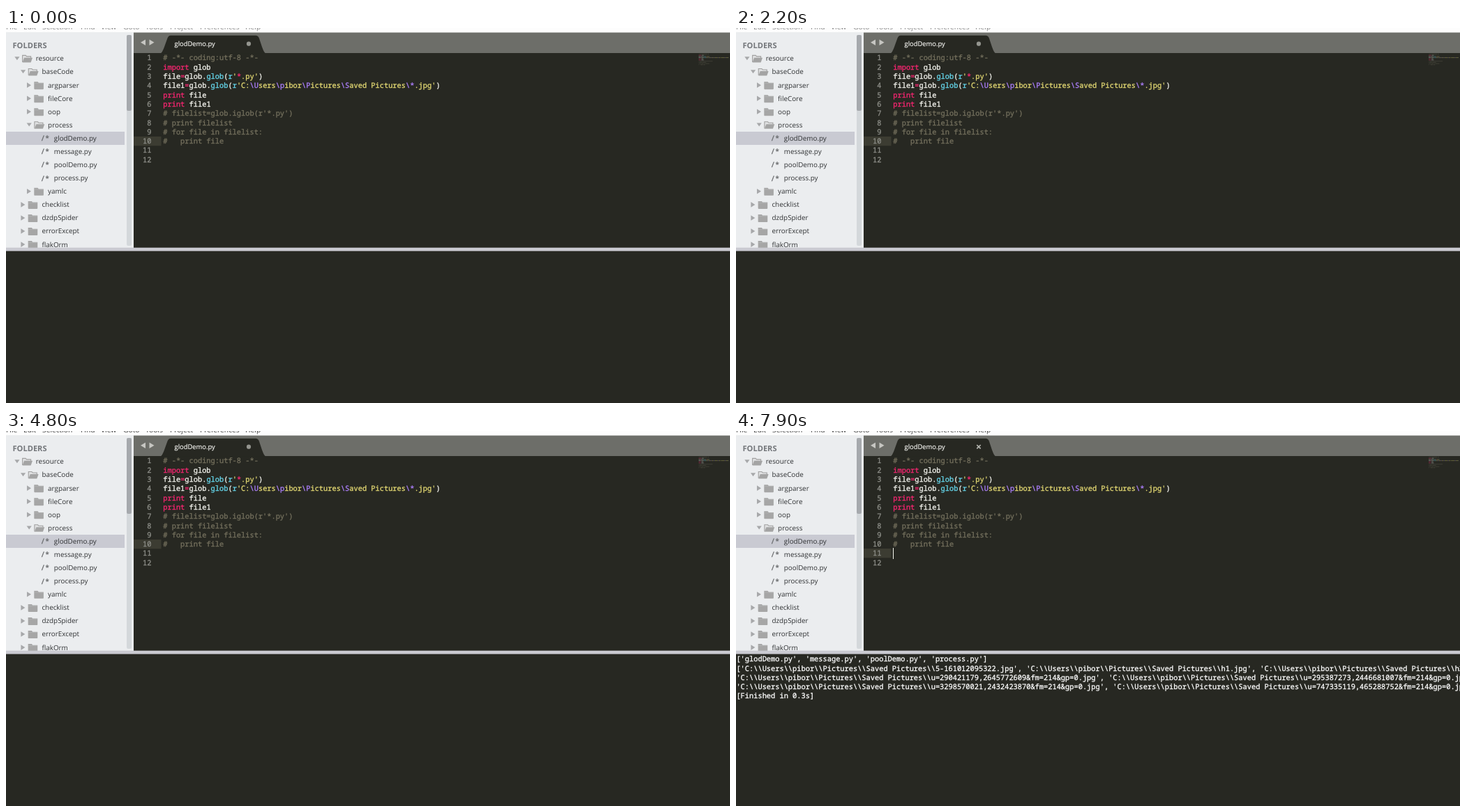
Animation, 1038 px wide and 539 px high, one loop 8 s. Source, as an HTML page:

```html
<!DOCTYPE html>
<html lang="en">
<head>
<meta charset="utf-8">
<title>Editor</title>
<style>
  html, body { margin: 0; width: 100%; height: 100%; overflow: hidden; background: #272822; }
  svg { display: block; }
  text { white-space: pre; text-rendering: geometricPrecision; }
  .ui { font-family: "Open Sans", "Noto Sans", sans-serif; }
  .code { font-family: "Noto Sans Mono", "DejaVu Sans Mono", monospace; font-size: 10.358px; stroke-width: .3px; }
</style>
</head>
<body>
<svg id="stage" width="1038" height="539" viewBox="0 0 1038 539"></svg>
<script>
const LOOP = 8000;
const stage = document.getElementById('stage');

function add(tag, attrs, parent = stage) {
  const el = document.createElementNS('http://www.w3.org/2000/svg', tag);
  for (const k in attrs) el.setAttribute(k, attrs[k]);
  parent.appendChild(el);
  return el;
}
const rect = (x, y, width, height, fill, more) => add('rect', { x, y, width, height, fill, ...more });
const path = (d, fill, more) => add('path', { d, fill, ...more });
function label(x, y, str, fill, size, more) {
  const el = add('text', { x, y, fill, 'font-size': size, class: 'ui', ...more });
  el.textContent = str;
  return el;
}
// A thin stroke in the text colour gives the heavier code weight.
function mono(x, y, parts, more) {
  const el = add('text', { x, y, class: 'code', ...more });
  for (const [fill, str] of parts) add('tspan', { fill, stroke: fill }, el).textContent = str;
  return el;
}

// Held values: each [time, value] lasts until the next one.
function hold(el, prop, steps) {
  const frames = steps.map(([t, v]) => ({ offset: t / LOOP, [prop]: v, easing: 'steps(1, end)' }));
  frames.push({ offset: 1, [prop]: steps[steps.length - 1][1] });
  el.animate(frames, { duration: LOOP, iterations: Infinity }).startTime = 0;
}

// Backgrounds
rect(0, 0, 1038, 539, '#272822');
rect(0, 0, 1038, 7, '#fdfdfd');
rect(0, 6, 183, 310, '#ebedef');
rect(183, 6.5, 855, 29.5, '#6d6e69');

// Menu bar, cut by the top edge
const menu = [['File', 0], ['Edit', 25], ['Selection', 52], ['Find', 107], ['View', 136], ['Goto', 168],
  ['Tools', 200], ['Project', 235], ['Preferences', 278], ['Help', 343]];
for (const [name, x] of menu) {
  hold(label(x, 1.5, name, '#888888', 10.25), 'fill', [[0, '#888888'], [4800, '#444444']]);
}

// Sidebar
const ROW = 19.08, TOP = 34.5;
const tree = [
  [0, 'resource', 'open'], [1, 'baseCode', 'open'], [2, 'argparser', 'shut'], [2, 'fileCore', 'shut'],
  [2, 'oop', 'shut'], [2, 'process', 'open'], [3, 'glodDemo.py', 'file'], [3, 'message.py', 'file'],
  [3, 'poolDemo.py', 'file'], [3, 'process.py', 'file'], [2, 'yamlc', 'shut'], [1, 'checklist', 'shut'],
  [1, 'dzdpSpider', 'shut'], [1, 'errorExcept', 'shut'], [1, 'flakOrm', 'shut']
];
const hovers = {
  8: [[0, 0], [800, .6], [900, 1], [1100, .5], [1200, 0]],
  7: [[0, 0], [1400, .5], [1500, 1], [1700, .5], [1800, 0]],
  10: [[0, 0], [1900, .5], [2000, 1], [2100, .5], [2200, 0]],
  12: [[0, 0], [2700, .5], [2800, 1], [3000, .5], [3100, 0]]
};
const rowTop = i => Math.round(TOP + ROW * i);

rect(0, rowTop(6), 170, 19, '#c9cad2');
for (const i in hovers) {
  hold(rect(0, rowTop(i), 170, 19, '#dadbe0', { opacity: 0 }), 'opacity', hovers[i]);
}

function folder(x, y, open) {
  if (!open) {
    path(`M${x} ${y - 5}h5.2l1.4 1.6h7v8.6q0 .8-.8.8h-12q-.8 0-.8-.8z`, '#a6a6a6');
    path(`M${x + .6} ${y - 2.6}h12.6`, 'none', { stroke: '#b9babb', 'stroke-width': .6 });
    return;
  }
  path(`M${x + .6} ${y + 5}v-9.6h4.6l1.4 1.5h6v2.2`, '#e0e1e2', { stroke: '#a0a0a0', 'stroke-width': 1.1 });
  path(`M${x + .6} ${y + 5.4}l2.5-6.6h11.9l-2.4 6.6z`, '#a4a4a4');
}

label(9.5, 28.7, 'FOLDERS', '#74777b', 11.1, { 'font-weight': 700 });
tree.forEach(([depth, name, kind], i) => {
  const y = 44 + ROW * i, x = depth * 8.65;
  if (kind === 'file') {
    mono(49.8, y + 3.8, [['#66686a', '/*']], { 'stroke-width': 0 });
  } else {
    const t = x + 12.3;
    path(kind === 'open' ? `M${t} ${y - 2.8}h7.2l-3.6 5z` : `M${t + .4} ${y - 3.8}v7.6l6-3.8z`, '#a7a8aa');
    folder(x + 23, y, kind === 'open');
  }
  label(x + 42.8, y + 3.4, name, '#303234', 9.85);
});

rect(173, 10, 7, 303, '#d4d8db', { rx: 2 });
rect(173, 10, 7, 109, '#a6a9ad', { rx: 2 });

// Tab strip
const back = path('M193 20.7l7-4.3v8.6z', '#c6c6c2');
hold(back, 'fill', [[0, '#c6c6c2'], [700, '#e4e4e0'], [800, '#c6c6c2']]);
path('M212.5 20.7l-7-4.3v8.6z', '#c6c6c2');
path('M222 36.2C225 34 227 27 231 16Q232.6 10.8 236 10.8H358Q361.4 10.8 363 15C367 27 369 34 372 36.2z', '#272822');
label(241.5, 26.3, 'glodDemo.py', '#f8f8f4', 9.4, { stroke: '#f8f8f4', 'stroke-width': .15 });
const dot = add('circle', { cx: 348, cy: 22.7, r: 3.1, fill: '#94958f' });
const cross = path('M345.3 20l5.4 5.4m0-5.4l-5.4 5.4', 'none', { stroke: '#b5b6b0', 'stroke-width': 1.7, opacity: 0 });
hold(dot, 'opacity', [[0, 1], [5900, 0]]);
hold(cross, 'opacity', [[0, 0], [5900, 1]]);

// Code
const W = '#f8f8f2', R = '#f92672', B = '#66d9ef', Y = '#e6db74', P = '#ae81ff', C = '#75715e';
const call = name => [[W, name], [R, '='], [W, 'glob.'], [B, 'glob'], [W, '('], [B, 'r']];
const code = [
  [[C, '# -*- coding:utf-8 -*-']],
  [[R, 'import'], [W, ' glob']],
  [...call('file'), [Y, "'"], [R, '*'], [Y, ".py'"], [W, ')']],
  [...call('file1'), [Y, "'C:"], [P, '\\U'], [Y, 'sers'], [P, '\\p'], [Y, 'ibor'], [P, '\\P'], [Y, 'ictures'],
    [P, '\\S'], [Y, 'aved Pictures'], [P, '\\*'], [Y, ".jpg'"], [W, ')']],
  [[R, 'print'], [W, ' file']],
  [[R, 'print'], [W, ' file1']],
  [[C, "# filelist=glob.iglob(r'*.py')"]],
  [[C, '# print filelist']],
  [[C, '# for file in filelist:']],
  [[C, '#   print file']],
  [],
  []
];
const LINE = 13.3;
const mark = rect(183, 156, 39.5, 13.3, '#3c3c32');
hold(mark, 'y', [[0, '156px'], [4900, '169px']]);

// Minimap
const view = rect(993, 36, 45, 36, '#ffffff', { opacity: 0 });
hold(view, 'opacity', [[0, 0], [300, .03], [400, 0]]);

code.forEach((parts, i) => {
  const y = 46.4 + LINE * i;
  mono(208.4, y, [['#8f908a', String(i + 1)]], { 'text-anchor': 'end' });
  mono(225.3, y, parts);
  let col = 0;
  for (const [fill, str] of parts) {
    for (const m of str.matchAll(/[^ ]+/g)) {
      rect(993 + (col + m.index) * .67, 37 + i * 1.7, m[0].length * .67, 1, fill, { opacity: .32 });
    }
    col += str.length;
  }
});

const caret = rect(225, 168, 1, 16, '#f8f8f0', { opacity: 0 });
hold(caret, 'opacity', [[0, 0], [4900, 1], [5300, .5], [5400, 0], [5900, .5], [6000, 1],
  [6300, .5], [6400, 0], [6800, .5], [6900, 1], [7300, 0], [7800, .5], [7900, 1]]);

// Build output
rect(0, 315.7, 1038, 4.9, '#cacad1');
const pic = name => String.raw`'C:\\Users\\pibor\\Pictures\\Saved Pictures\\` + name + ".jpg', ";
const output = [
  "['glodDemo.py', 'message.py', 'poolDemo.py', 'process.py']",
  '[' + pic('5-161012095322') + pic('h1') + pic('h2'),
  pic('u=290421179,2645772609&fm=214&gp=0') + pic('u=295387273,2446681007&fm=214&gp=0'),
  pic('u=3298570021,2432423870&fm=214&gp=0') + pic('u=747335119,465288752&fm=214&gp=0'),
  '[Finished in 0.3s]'
];
output.forEach((str, i) => {
  const el = mono(.4, 331.2 + LINE * i, [['#ffffff', str]], { opacity: 0 });
  hold(el, 'opacity', [[0, 0], [i < 4 ? 6700 : 7000, 1]]);
});
</script>
</body>
</html>
```
